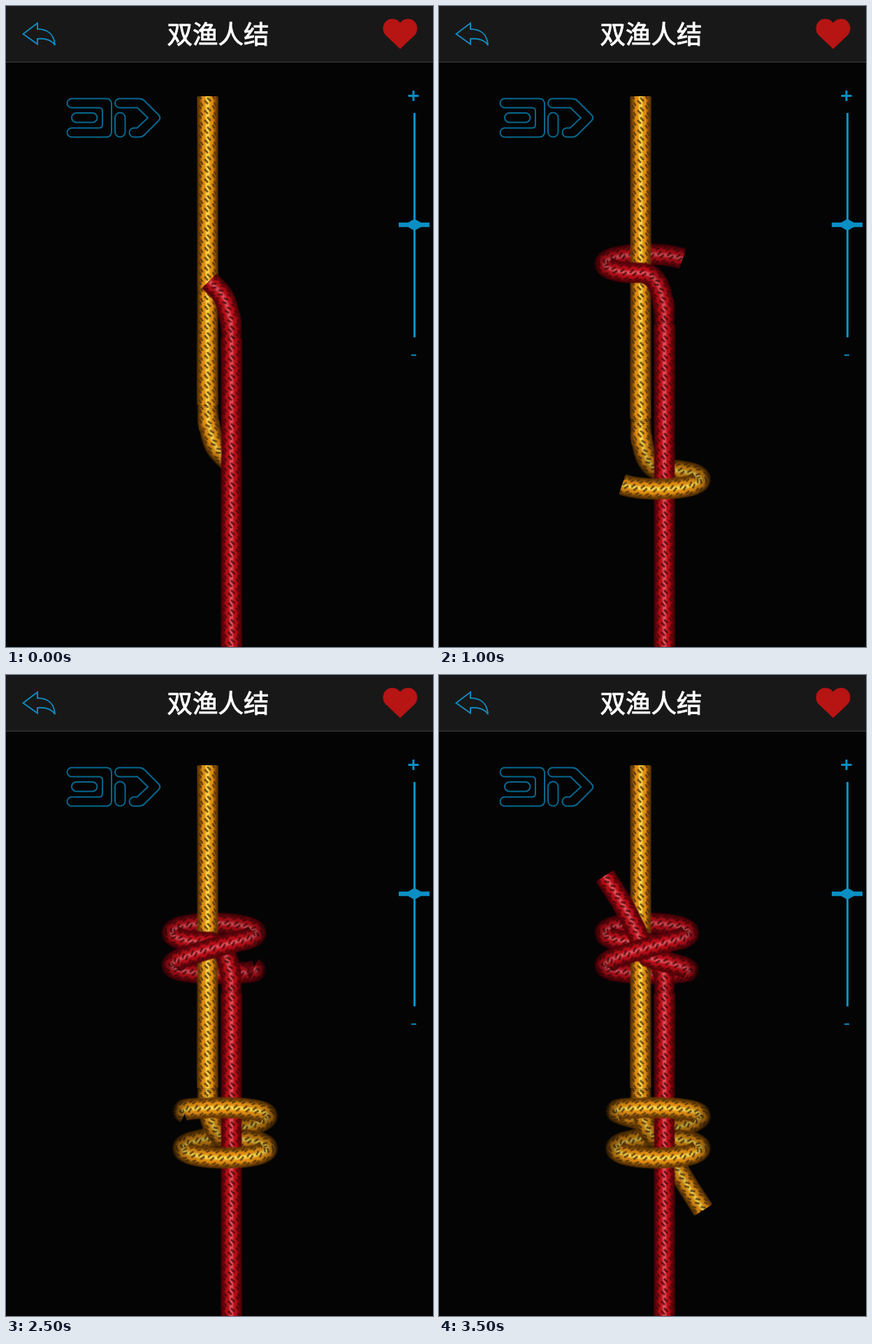
An HTML page with a canvas for the animation above (4500 ms loop, 611x917 px).

```html
<!DOCTYPE html>
<html lang="zh">
<head>
<meta charset="utf-8">
<style>
html, body { margin: 0; width: 100%; height: 100%; overflow: hidden; background: #040404; }
svg, canvas { position: absolute; left: 0; top: 0; }
text { font: 500 36.5px "Noto Sans CJK SC", "Noto Sans CJK", sans-serif; fill: #fff; stroke: #fff; stroke-width: .9; }
</style>
</head>
<body>
<svg width="611" height="917" fill="none">
  <rect width="611" height="80" fill="#181818"/>
  <rect y="79.5" width="611" height="1.5" fill="#333"/>
  <text x="303.5" y="54" text-anchor="middle">双渔人结</text>
  <path d="M24.5 40L45 24.500V33C60 33 69 41 70 56C65 48 57 46 45 47V54.500Z" stroke="#1487b8" stroke-width="2"/>
  <path d="M564 61L543 41C537 34 540 20 551 19C557 18.500 562 21 564 25C566 21 571 18.500 577 19C588 20 591 34 585 41Z" fill="#b71414" stroke="#b71414"/>
  <g stroke="#046890" stroke-width="2">
    <path d="M94 132.500H144a7 7 0 0 1 7 7V180.500a7 7 0 0 1-7 7H94a6.500 6.500 0 0 1 0-13H133q5 0 5-5V150.500q0-5-5-5H94a6.500 6.500 0 0 1 0-13Z"/>
    <rect x="94" y="153" width="36.5" height="13.5" rx="6.7"/>
    <rect x="156" y="152.5" width="14.5" height="35" rx="7.2"/>
    <path d="M162.500 132.500H190q5 0 8 3L218.500 156q3.500 4 0 8L198 184.500q-3 3-8 3H183a6.500 6.500 0 0 1 0-13H187.500L203 160L188 145.500H162.500a6.500 6.500 0 0 1 0-13Z"/>
  </g>
  <g stroke="#0a8fc4" stroke-width="3">
    <path d="M584.5 153V474M575.5 128.500H590.500M583 121V136"/>
    <path d="M580 499.500H587" stroke-width="2"/>
    <path d="M562 313H606" stroke-width="6.5"/>
    <path d="M570 313L584.500 304.500L599 313L584.500 321.500Z" fill="#0a8fc4" stroke="none"/>
  </g>
</svg>
<canvas id="stage" width="611" height="917"></canvas>
<script>
const ctx = document.getElementById('stage').getContext('2d');
const PITCH = 14, WIDE = 31, SHADES = 24;

// One pitch of braided rope along x, darkened by shade (0 to 1)
function braid(edge, side, mid, mark, shade) {
  const c = document.createElement('canvas');
  c.width = PITCH;
  c.height = WIDE;
  const g = c.getContext('2d');
  const fill = g.createLinearGradient(0, 0, 0, WIDE);
  for (const [at, color] of [[0, edge + '00'], [.1, edge], [.27, side], [.36, side], [.47, mid]]) {
    fill.addColorStop(at, color);
    fill.addColorStop(1 - at, color);
  }
  g.fillStyle = fill;
  g.fillRect(0, 0, PITCH, WIDE);
  g.strokeStyle = mark;
  g.lineWidth = 2.6;
  // A fleck is a pair of short diagonal threads
  const fleck = (x, y, h) => {
    for (const k of [-1, 1]) {
      g.beginPath();
      g.moveTo(x + k * 2 - 2.5, y + k * h * .4 + h * .5);
      g.lineTo(x + k * 2 + 2.5, y + k * h * .4 - h * .5);
      g.stroke();
    }
  };
  for (const wrap of [-PITCH, 0, PITCH]) {
    fleck(wrap + 6, WIDE / 2, 5);
    for (const k of [-1, 1]) fleck(wrap + 13, WIDE / 2 + k * 9.5, 3);
  }
  g.globalCompositeOperation = 'source-atop';
  g.fillStyle = `rgba(0,0,0,${shade})`;
  g.fillRect(0, 0, PITCH, WIDE);
  return c;
}

const skins = (...colors) => Array.from({ length: SHADES }, (_, i) => braid(...colors, i / SHADES));

function ease(v) {
  v = Math.max(0, Math.min(1, v));
  return v * v * (3 - 2 * v);
}

// Two turns around the other rope: a flat ring, a rise to a second ring, a way back down
function coil(turn) {
  const a = 2 * Math.PI * turn;
  const rise = 72 * (ease((turn - .88) / .62) - ease((turn - 1.5) / .75));
  return [
    313.5 + 60.5 * Math.sin(a),
    677 - 14 * Math.cos(a) - rise,
    -22 * Math.cos(a) - 8 * Math.sin(Math.PI * turn / 2) ** 2 - 1.5 * turn
  ];
}

// Way points as x, y, depth
const stem = [[288.5, 130, 0], [288.5, 400, 0], [288.5, 590, 0], [291, 625, -2], [299, 650, -12]];
const tail = [[326, 674, -24], [347, 716, -14], [378, 765, -8]];
const loose = [...stem.slice(0, 2), [288.5, 570, 0], [292, 605, -3], [301, 632, -8], [320, 652, -15]];
const tied = [...stem, ...Array.from({ length: 25 }, (_, i) => coil(i / 12)), ...tail];

// The red rope is the gold one reflected through the middle of the knot
const flip = path => path.map(([x, y, z]) => [611 - x, 1046 - y, -z]);

// tips: how many way points each rope has passed at each step
const ropes = [
  { skins: skins('#6a3a00', '#e08c10', '#ffdc50', '#4a300acc'), loose, tied,
    tips: [5, 8.4, 12.9, 16.4, 22.8, 26.6, 30.7, 32] },
  { skins: skins('#580006', '#b40c16', '#e4505a', '#40060acc'), loose: flip(loose), tied: flip(tied),
    tips: [5, 8.4, 12.9, 16.4, 21.4, 26.6, 30.3, 31.8] }
];

// Catmull-Rom position at u, counted in way points
function at(path, u) {
  const last = path.length - 1;
  u = Math.max(0, Math.min(last, u));
  const i = Math.min(Math.floor(u), last - 1), t = u - i;
  const [a, b, c, d] = [-1, 0, 1, 2].map(k => path[Math.max(0, Math.min(last, i + k))]);
  return b.map((p, k) => p + t / 2 * (c[k] - a[k]
    + t * (2 * a[k] - 5 * p + 4 * c[k] - d[k] + t * (3 * p - a[k] - 3 * c[k] + d[k]))));
}

const gap = (p, q) => Math.hypot(...p.map((v, k) => v - q[k]));

function slices(rope, step) {
  const path = step ? rope.tied : rope.loose, out = [];
  let run = 0, old = path[0];
  for (let u = 0; u < rope.tips[step];) {
    const p = at(path, u), q = at(path, u + .01), o = at(path, u - .01);
    run += gap(p, old);
    old = p;
    const tilt = Math.abs(q[2] - o[2]) / gap(q, o);
    const dark = Math.min(.6, .4 * tilt ** 1.5 + Math.max(0, -p[2]) * .009);
    const skin = rope.skins[Math.floor(dark * SHADES)];
    out.push({ skin, p, run, turn: Math.atan2(q[1] - o[1], q[0] - o[0]) });
    const i = Math.min(Math.floor(u), path.length - 2);
    u += .6 / gap(path[i], path[i + 1]);
  }
  return out;
}

function draw(step) {
  ctx.setTransform(1, 0, 0, 1, 0, 0);
  ctx.clearRect(0, 0, 611, 917);
  const all = ropes.flatMap(rope => slices(rope, step)).sort((a, b) => a.p[2] - b.p[2]);
  for (const { skin, p, run, turn } of all) {
    const c = Math.cos(turn), s = Math.sin(turn);
    ctx.setTransform(c, s, -s, c, p[0], p[1]);
    ctx.drawImage(skin, Math.floor(run) % PITCH, 0, 1, WIDE, -.8, -WIDE / 2, 1.6, WIDE);
  }
}

let shown = -1;
function tick() {
  const step = Math.min(7, Math.floor(performance.now() % 4500 / 500));
  if (step !== shown) draw(shown = step);
  requestAnimationFrame(tick);
}
tick();
</script>
</body>
</html>
```
